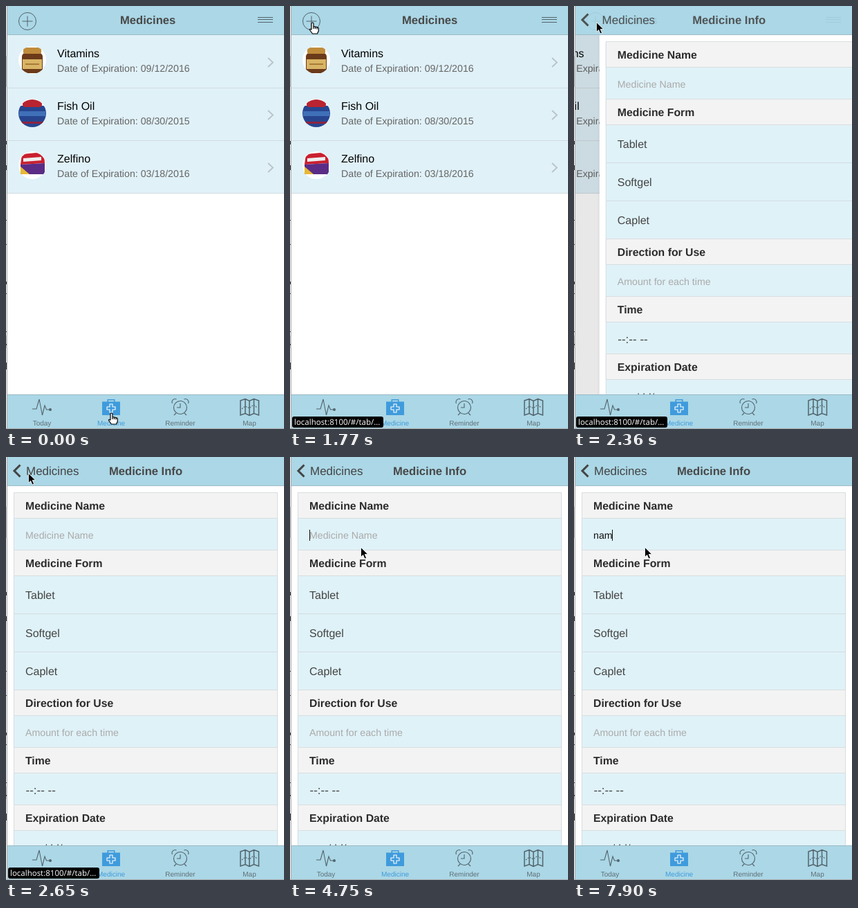
Recreate the animation shown at these times as an HTML page. Size 402 by 611 pixels, loop 8000 ms.

```html
<!DOCTYPE html>
<html lang="en">
<head>
<meta charset="utf-8">
<title>Medicines</title>
<style>
@property --p { syntax: "<number>"; inherits: true; initial-value: 0; }

html, body { margin: 0; width: 100%; height: 100%; overflow: hidden; background: #fff; }
svg { display: block; font: 16px "Liberation Sans", Arial, sans-serif; text-rendering: geometricPrecision; }

/* Every keyframe is a hard step: percent = ms / 80 */
svg, .title, .tip, .short, .long, .cursor, .hand, .arrow, .beam, .caret, .hint, .key {
  animation: 8s step-end infinite;
}

/* --p is the progress of the page change */
svg { animation-name: slide; }
.old { transform: translateX(calc(var(--p) * -132px)); }
.new { transform: translateX(calc((1 - var(--p)) * 400px)); }
.dim { opacity: calc(var(--p) * .1); }
.edge { opacity: calc(var(--p) * (1 - var(--p)) * 4); }
.out { opacity: calc(1 - var(--p)); }
.in { opacity: var(--p); }
.to-back { transform: translateX(calc(var(--p) * -133px)); }
.from-title { transform: translateX(calc((1 - var(--p)) * 133px)); }
.to-title { transform: translateX(calc((1 - var(--p)) * 255px)); }

.title { animation-name: settle; }
.tip { animation-name: tip; }
.short { animation-name: short; }
.long { animation-name: long; }
.cursor { animation-name: move; }
.hand { animation-name: hand; }
.arrow { animation-name: arrow; }
.beam { animation-name: beam; }
.caret { animation-name: blink; }
.hint { animation-name: hint; }
.key { animation-name: key1; }
.key.b { animation-name: key2; }
.key.c { animation-name: key3; }

.bold { font-weight: bold; font-size: 15.8px; fill: #2b2b2b; }
.head { font-size: 16.6px; font-weight: bold; fill: #484848; }
.sub { font-size: 14.2px; fill: #666; }
.hint, .ghost { font-size: 14.2px; fill: #aaa; }
.typed { font-size: 14.2px; fill: #111; }
.opt { fill: #444; }
.tabs text { font-size: 10px; text-anchor: middle; fill: #5f6f77; }
.tabs .on { fill: #3f9bdc; }
.line { fill: none; stroke: #52636b; }
.status { font: 11.5px "Open Sans", sans-serif; fill: #fff; }

@keyframes slide {
  0% { --p: 0; } 27.625% { --p: .31; } 29.5% { --p: .913; }
  31.375% { --p: .988; } 33.125%, 100% { --p: 1; }
}
@keyframes settle {
  0% { transform: translateX(3px); } 1.875%, 100% { transform: none; }
}
@keyframes tip {
  0% { opacity: 0; } 3.75% { opacity: 1; } 9.25% { opacity: .6; } 11.125% { opacity: 0; }
  18.5% { opacity: .5; } 20.25% { opacity: 1; } 40.625% { opacity: .66; } 42.5%, 100% { opacity: 0; }
}
@keyframes short { 0% { opacity: 1; } 36.875%, 100% { opacity: 0; } }
@keyframes long { 0% { opacity: 0; } 36.875%, 100% { opacity: 1; } }
@keyframes move {
  0% { transform: translate(153px, 588px); }
  1.875% { transform: translate(152px, 586px); }
  3.75% { transform: translate(146px, 563px); }
  5.625% { transform: translate(128px, 470px); }
  7.5% { transform: translate(105px, 340px); }
  9.25% { transform: translate(85px, 210px); }
  11.125% { transform: translate(62px, 110px); }
  13% { transform: translate(46px, 38px); }
  14.875% { transform: translate(36px, 27px); }
  16.625% { transform: translate(33px, 24px); }
  36.875% { transform: translate(42px, 60px); }
  38.75% { transform: translate(54px, 95px); }
  40.625% { transform: translate(60px, 104px); }
  42.5% { transform: translate(61px, 107px); }
  51.875% { transform: translate(85px, 120px); }
  53.75%, 100% { transform: translate(103px, 131px); }
}
@keyframes hand {
  0% { opacity: 1; } 5.625% { opacity: 0; } 9.25% { opacity: 1; } 13% { opacity: 0; }
  14.875% { opacity: 1; } 27.625%, 100% { opacity: 0; }
}
@keyframes arrow {
  0% { opacity: 0; } 5.625% { opacity: 1; } 9.25% { opacity: 0; } 13% { opacity: 1; }
  14.875% { opacity: 0; } 27.625% { opacity: 1; } 38.75% { opacity: 0; } 53.75%, 100% { opacity: 1; }
}
@keyframes beam { 0% { opacity: 0; } 38.75% { opacity: 1; } 53.75%, 100% { opacity: 0; } }
@keyframes blink {
  0% { opacity: 0; transform: none; }
  46.25%, 59.375%, 70.625%, 83.75% { opacity: 1; transform: none; }
  51.875%, 65%, 78.125%, 89.375% { opacity: 0; transform: none; }
  95% { opacity: 1; transform: translateX(8px); }
  96.875% { opacity: 1; transform: translateX(16px); }
  98.75%, 100% { opacity: 1; transform: translateX(27px); }
}
@keyframes hint { 0% { opacity: 1; } 95%, 100% { opacity: 0; } }
@keyframes key1 { 0% { fill-opacity: 0; } 95%, 100% { fill-opacity: 1; } }
@keyframes key2 { 0% { fill-opacity: 0; } 96.875%, 100% { fill-opacity: 1; } }
@keyframes key3 { 0% { fill-opacity: 0; } 98.75%, 100% { fill-opacity: 1; } }
</style>
</head>
<body>
<svg width="402" height="611" viewBox="0 0 402 611">
  <defs>
    <clipPath id="view"><path d="M2 42H402V561H2z"/></clipPath>
    <clipPath id="bar"><path d="M2 0H402V42H2z"/></clipPath>
    <clipPath id="round"><circle r="20"/></clipPath>
    <linearGradient id="shade">
      <stop offset="0" stop-opacity="0"/><stop offset="1" stop-opacity=".12"/>
    </linearGradient>
    <g id="row">
      <path fill="none" stroke="#b9c3c8" stroke-width="1.800" d="M379 33l7 6.500-7 6.500"/>
      <circle cx="38" cy="36" r="20" fill="#fff"/>
    </g>
    <path id="divider" fill="#f3f3f3" stroke="#d9dddf" d="M11.500 .5H392.500V37.500H11.500z"/>
  </defs>

  <!-- list page -->
  <g clip-path="url(#view)">
    <g class="old">
      <path fill="#fff" d="M2 42H402V561H2z"/>
      <path fill="#e0f1f8" d="M2 42H402V270H2z"/>
      <path stroke="#d3dbde" d="M2 118.500H402M2 194.500H402M2 270.500H402"/>
      <use href="#row" y="42"/>
      <use href="#row" y="118"/>
      <use href="#row" y="194"/>
      <g transform="translate(38 78)" clip-path="url(#round)">
        <rect x="-15" y="-10" width="30" height="29" rx="5" fill="#6b3a1a"/>
        <rect x="-13" y="-18" width="26" height="9" rx="2" fill="#c08c3c"/>
        <path fill="#d8b566" d="M-14-1H14V13H-14z"/>
        <path fill="#a87b35" d="M-10 5H10V7H-10z"/>
      </g>
      <g transform="translate(38 155)" clip-path="url(#round)">
        <rect x="-20" y="-11" width="40" height="31" rx="5" fill="#27458f"/>
        <rect x="-14" y="-20" width="28" height="11" rx="4" fill="#b92430"/>
        <path fill="#3f70b8" d="M-19-3H19V4H-19z"/>
        <path fill="#8d2440" d="M-16 12H16V15H-16z"/>
      </g>
      <g transform="translate(38 231)" clip-path="url(#round)">
        <path fill="#c9202f" d="M-15-17L17-20 18-4-17-2z"/>
        <path fill="#5a2c86" d="M-17-2L18-4V12H-17z"/>
        <path fill="#e8b934" d="M-17 1L-4 12H-17z"/>
        <path fill="#eee" d="M-13-11L13-13V-8L-13-6z"/>
      </g>
      <text x="74" y="74">Vitamins</text>
      <text x="74" y="95" class="sub">Date of Expiration: 09/12/2016</text>
      <text x="74" y="150">Fish Oil</text>
      <text x="74" y="171" class="sub">Date of Expiration: 08/30/2015</text>
      <text x="74" y="226">Zelfino</text>
      <text x="74" y="247" class="sub">Date of Expiration: 03/18/2016</text>
    </g>
    <path class="dim" d="M2 42H402V561H2z"/>

    <!-- form page -->
    <g class="new">
      <path class="edge" fill="url(#shade)" d="M-2 42H2V561H-2z"/>
      <path fill="#fff" d="M2 42H402V561H2z"/>
      <path fill="#dff2f8" stroke="#d3dde1" d="M11.500 51.500H392.500V590H11.500z"/>
      <path stroke="#d3dde1" d="M12 226.500H392M12 281.500H392"/>
      <use href="#divider" y="51"/>
      <use href="#divider" y="134"/>
      <use href="#divider" y="336"/>
      <use href="#divider" y="419"/>
      <use href="#divider" y="502"/>
      <g class="bold">
        <text x="28" y="76">Medicine Name</text>
        <text x="28" y="159">Medicine Form</text>
        <text x="28" y="361">Direction for Use</text>
        <text x="28" y="444">Time</text>
        <text x="28" y="527">Expiration Date</text>
      </g>
      <text x="28" y="118" class="hint">Medicine Name</text>
      <text x="28" y="118" class="typed"><tspan class="key">n</tspan><tspan class="key b">a</tspan><tspan class="key c">m</tspan></text>
      <path class="caret" fill="#111" d="M28 105h1v16h-1z"/>
      <g class="opt">
        <text x="28" y="205">Tablet</text>
        <text x="28" y="260">Softgel</text>
        <text x="28" y="315">Caplet</text>
        <text x="28.500" y="487" font-size="17">--:-- --</text>
        <text x="28" y="570.500">mm/dd/yyyy</text>
      </g>
      <text x="28" y="403" class="ghost">Amount for each time</text>
    </g>
  </g>

  <!-- header -->
  <g clip-path="url(#bar)">
    <path fill="#abd7e6" d="M2 0H402V41H2z"/>
    <path fill="#9fbac5" d="M2 41H402V42H2z"/>
    <g class="out">
      <g class="line">
        <circle cx="31" cy="22" r="12.500"/>
        <path d="M23.500 22h15M31 14.500v15"/>
        <path d="M364 16.500h22M364 19.500h22M364 23.500h22"/>
      </g>
      <g class="to-back"><text x="162" y="26" class="head title">Medicines</text></g>
    </g>
    <g class="in">
      <path fill="none" stroke="#444" stroke-width="3" d="M20.500 11.500L12 20l8.500 8.500"/>
      <text x="29" y="26" class="from-title" font-size="17" fill="#444">Medicines</text>
      <text x="149" y="26" class="head to-title">Medicine Info</text>
    </g>
  </g>

  <!-- tab bar -->
  <g class="tabs">
    <path fill="#abd7e6" d="M2 561H402V611H2z"/>
    <path fill="#9ab9c5" d="M2 561H402V562H2z"/>
    <g class="line" stroke-width="1.100">
      <path d="M38 582h6l4-14 4.500 23 3.500-14 2.500 6h4"/>
      <circle cx="252" cy="580" r="9.500"/>
      <path d="M252 574v6h-5M246 588l-3 3M258 588l3 3M240.500 574a4.500 4.500 0 0 1 6-6M263.500 574a4.500 4.500 0 0 0-6-6"/>
      <path stroke-width="1.500" d="M339 570l7-2.500 6 3 6.500-3 7 2.500v21l-7-2.500-6.500 3-6-3-7 2.500zM346 568v20M352 571v20M358.500 568v20"/>
      <path stroke-dasharray="2 1.500" d="M341 582l5-4 6 3 6-5 5 4"/>
    </g>
    <circle cx="64" cy="583" r="2" fill="#52636b"/>
    <path fill="#3f9bdc" d="M139 571.500h7.500v-3.500h11v3.500H165V591H139z"/>
    <path fill="#abd7e6" d="M148 569.500h8v2h-8z"/>
    <path fill="none" stroke="#fff" stroke-width="1.100" d="M150 575h4v4h4v4h-4v4h-4v-4h-4v-4h4z"/>
    <text x="52" y="606">Today</text>
    <text x="152" y="606" class="on">Medicine</text>
    <text x="252" y="606">Reminder</text>
    <text x="352" y="606">Map</text>
  </g>

  <!-- window edge and what shows behind it -->
  <path fill="#f4f4f4" d="M0 0H1V611H0z"/>
  <path fill="#a9a9a9" d="M1 0H2V611H1zM0 610H402V611H0z"/>
  <path fill="#bbb" d="M0 72H2V117H0zM0 476H2V494H0z"/>
  <path fill="#333" d="M0 195h1v5h-1zM0 230h1v7h-1zM0 309h1v1h-1zM0 344h1v1h-1zM0 398h1v4h-1zM0 415h1v1h-1zM0 470h1v1h-1zM0 488h1v2h-1zM0 515h1v10h-1z"/>

  <!-- status bubble -->
  <g class="tip status">
    <g class="short">
      <rect x="3" y="593" width="132" height="16" rx="3" fill="#000"/>
      <text x="6" y="605">localhost:8100/#/tab/...</text>
    </g>
    <g class="long">
      <rect x="2" y="593" width="195" height="16" rx="3" fill="#000"/>
      <text x="6" y="605">localhost:8100/#/tab/add-medicine</text>
    </g>
  </g>

  <!-- pointer -->
  <g class="cursor">
    <path class="hand" fill="#fff" stroke="#000" stroke-width="1.200" stroke-linejoin="round" d="M-2 10V1.500a1.500 1.500 0 0 1 3 0V6q1.500-1 2.500 .5 1.500-1 2.500 .5 2-.5 2.300 1.500v3.500L6.500 16H-.5L-4.500 10.500q0-2 2.500-.5zM1 6v3M3.500 6.500V9M6 7V9.500"/>
    <path class="arrow" stroke="#fff" stroke-width=".8" d="M-.5-.5V13.500L2.700 10.500 5 16 7.500 15 5.200 9.600H9.700z"/>
    <path class="beam" fill="none" stroke="#222" stroke-width="1.200" d="M-3-7Q0-7 0-5 0-7 3-7M0-5V5M-3 7Q0 7 0 5 0 7 3 7M-2 3H2"/>
  </g>
</svg>
</body>
</html>
```
